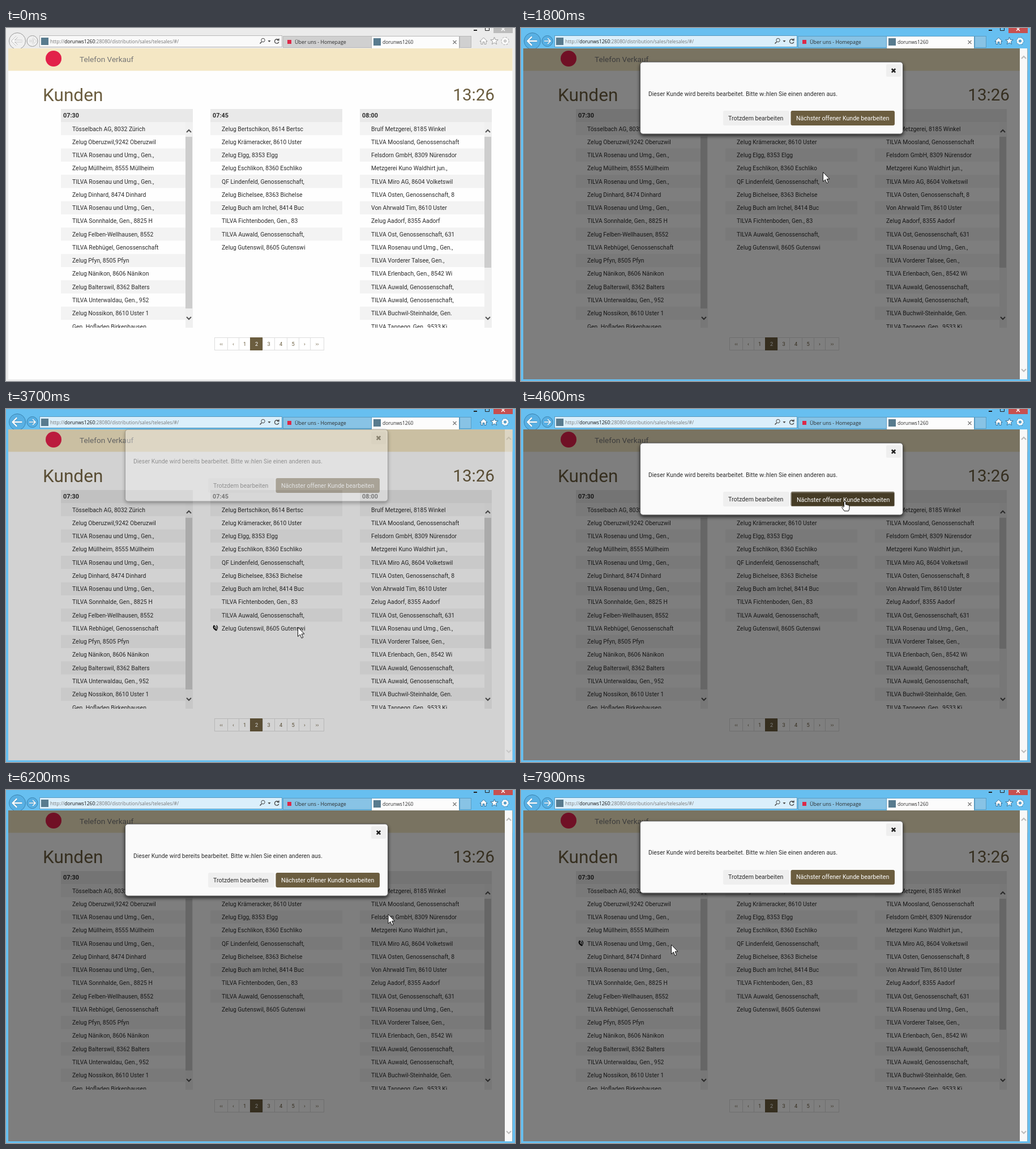
An HTML page for the animation above (8 s loop, 899 by 623 pixels).

```html
<!DOCTYPE html>
<html lang="de">
<head>
<meta charset="utf-8">
<title>Telefon Verkauf</title>
<style>
html, body { margin: 0; width: 100%; height: 100%; overflow: hidden; }
svg {
  display: block; width: 899px; height: 623px;
  font: 10.4px Roboto, sans-serif; fill: #2c2c2c;
  --chrome: #ebebeb; --bar: #f9f9f9; --edge: #b8b8b8; --tab: #d0d0d0;
  --disc: #f0f0f0; --ring: #9a9a9a; --glyph: #fff; --line: #999; --close: #bcbcbc;
}
svg.active {
  --chrome: #67bff0; --bar: #dbeffb; --edge: #5a9cc2; --tab: #88c3e5;
  --disc: #58b0e4; --ring: #3c83ae; --glyph: #fff; --line: #2f6f98; --close: #c75050;
}
.ui { font-family: "Open Sans", sans-serif; }
.line { fill: none; stroke: #444; }
.olive { fill: #6b5d3f; }
</style>
</head>
<body>
<svg id="stage" viewBox="0 0 899 623"></svg>
<script>
const stage = document.getElementById('stage');

const rect = (x, y, w, h, fill, extra = '') =>
  `<rect x="${x}" y="${y}" width="${w}" height="${h}" style="fill:${fill}" ${extra}/>`;
const text = (x, y, str, extra = '') => `<text x="${x}" y="${y}" ${extra}>${str}</text>`;
const line = (d, color, width = 1, extra = '') =>
  `<path d="${d}" class="line" style="stroke:${color};stroke-width:${width}" ${extra}/>`;
const shape = (d, fill, stroke, extra = '') =>
  `<path d="${d}" style="fill:${fill};stroke:${stroke}" ${extra}/>`;
const chevron = (x, y, dir, color) =>
  line(`M${x - 4} ${y + 2 * dir}l4 ${-4 * dir}l4 ${4 * dir}`, color, 2);

function navButton(x, r) {
  const a = r * .58;
  const flip = r < 12 ? -1 : 1;
  const arrow = `M${a} 0H${-a}M${-a * .1} ${-a * .9}L${-a} 0L${-a * .1} ${a * .9}`;
  return `<g transform="translate(${x} 23) scale(${flip} 1)">
    <circle r="${r}" style="fill:var(--disc);stroke:var(--ring)"/>
    ${line(arrow, 'var(--ring)', r / 4.2)}${line(arrow, 'var(--glyph)', r / 6)}</g>`;
}

function browser() {
  const star = Array.from({ length: 10 }, (_, i) => {
    const a = i * Math.PI / 5 - Math.PI / 2, r = i % 2 ? 3 : 7;
    return `${862.5 + r * Math.cos(a)},${23 + r * Math.sin(a)}`;
  }).join(' ');
  return rect(0, 0, 899, 623, 'var(--chrome)') +
    navButton(20, 14.5) + navButton(46.5, 9.5) +
    rect(59.5, 13.5, 428, 20, 'var(--bar)', 'stroke="var(--edge)"') +
    rect(62, 17, 13, 13, '#587b8e') +
    `<g class="ui" font-size="8.5">
      <text x="78" y="27" fill="#777">http://<tspan fill="#111">dorunws1260</tspan>:28080/distribution/sales/telesales/#/</text>` +
    line('M451.5 24.5l-3 3', '#444', 1.6) +
    '<circle cx="454" cy="21.5" r="3.2" class="line"/>' +
    shape('M462.5 22h5l-2.5 3z', '#444', 'none') +
    line('M481 21a3.7 3.7 0 1 0 .8 3.5M482 18.5v3h-3', '#444', 1.3) +
    rect(489.5, 14.5, 156, 20, 'var(--tab)', 'stroke="var(--edge)"') +
    rect(497, 21, 7, 7, '#dd2948') +
    text(510, 28, 'Über uns - Homepage', 'font-size="8.9"') +
    rect(645.5, 14.5, 155, 22, '#fcfcfc', 'stroke="var(--edge)"') +
    rect(649, 18, 13, 13, '#587b8e') + text(665, 28, 'dorunws1260') + '</g>' +
    line('M789.5 22l6 6m0 -6l-6 6', '#777', 1.2) +
    rect(801.5, 14.5, 20, 20, 'var(--tab)', 'stroke="var(--edge)"') +
    shape('M837 23.5l6.5 -6.5l6.5 6.5h-2v5h-3v-4h-3v4h-3v-5z', 'var(--glyph)', 'var(--line)') +
    `<polygon points="${star}" style="fill:var(--glyph);stroke:var(--line)"/>` +
    '<g transform="translate(881.5 23)" style="fill:none;stroke:var(--glyph)">' +
    '<circle r="5.6" style="stroke:var(--line);stroke-width:3;stroke-dasharray:2.2"/>' +
    '<circle r="3.7" style="stroke-width:3"/>' +
    '<circle r="5.6" style="stroke-width:1.5;stroke-dasharray:2.2"/>' +
    '<circle r="2" style="stroke:var(--line)"/></g>' +
    rect(826, 3, 6, 2, '#222') + line('M846.5 0v4.5h7v-4.5', '#222') +
    rect(861, 0, 34, 9, 'var(--close)') + line('M875 -1l6 6m0 -6l-6 6', '#fff', 1.4);
}

const shop = place => 'Zelug ' + place, coop = name => 'TILVA ' + name;
const village = coop('Rosenau und Umg., Gen.,'), valley = coop('Auwald, Genossenschaft,');
const columns = [
  { x: 97, time: '07:30', thumb: 303, rows: [
    'Tösselbach AG, 8032 Zürich', shop('Oberuzwil,9242 Oberuzwil'), village,
    shop('Müllheim, 8555 Müllheim'), village, shop('Dinhard, 8474 Dinhard'), village,
    coop('Sonnhalde, Gen., 8825 H'), shop('Felben-Wellhausen, 8552'),
    coop('Rebhügel, Genossenschaft'), shop('Pfyn, 8505 Pfyn'), shop('Nänikon, 8606 Nänikon'),
    shop('Balterswil, 8362 Balters'), coop('Unterwaldau, Gen., 952'),
    shop('Nossikon, 8610 Uster 1'), 'Gen. Hofladen Birkenhausen'] },
  { x: 361, time: '07:45', rows: [
    shop('Bertschikon, 8614 Bertsc'), shop('Krämeracker, 8610 Uster'), shop('Elgg, 8353 Elgg'),
    shop('Eschlikon, 8360 Eschliko'), 'QF Lindenfeld, Genossenschaft,',
    shop('Bichelsee, 8363 Bichelse'), shop('Buch am Irchel, 8414 Buc'),
    coop('Fichtenboden, Gen., 83'), valley, shop('Gutenswil, 8605 Gutenswi')] },
  { x: 625, time: '08:00', thumb: 231, rows: [
    'Brulf Metzgerei, 8185 Winkel', coop('Moosland, Genossenschaft'),
    'Felsdorn GmbH, 8309 Nürensdor', 'Metzgerei Kuno Waldhirt jun.,',
    coop('Miro AG, 8604 Volketswil'), coop('Osten, Genossenschaft, 8'),
    'Von Ahrwald Tim, 8610 Uster', shop('Aadorf, 8355 Aadorf'),
    coop('Ost, Genossenschaft, 631'), village, coop('Vorderer Talsee, Gen.,'),
    coop('Erlenbach, Gen., 8542 Wi'), valley, valley,
    coop('Buchwil-Steinhalde, Gen.'), coop('Tannegg, Gen., 9533 Ki')] }
];

function column({ x, time, thumb, rows }) {
  const pitch = 23.27, width = thumb ? 220 : 233;
  let out = rect(x, 143, 233, 23, '#e9e9e9') +
    text(x + 4, 158, time, 'font-weight="700" font-size="10.8"');
  rows.forEach((row, i) => {
    const y = 166 + i * pitch;
    if (i % 2 == 0) out += rect(x, y, width, pitch, '#f3f3f3');
    out += text(x + 20, y + 15.5, row);
  });
  if (thumb) out += rect(x + 220, 166, 13, 363, '#f0f0f0') +
    rect(x + 220, 192, 12, thumb, '#cdcdcd') +
    chevron(x + 226, 182, 1, '#555') + chevron(x + 226, 512, -1, '#555');
  return `<g clip-path="url(#list)">${out}</g>`;
}

function pager() {
  const edges = [368, 391, 411, 431, 453, 474, 496, 517, 537, 561];
  return '<g text-anchor="middle" font-size="9.3">' +
    ['‹‹', '‹', 1, 2, 3, 4, 5, '›', '››'].map((label, i) => {
      const x = edges[i], w = edges[i + 1] - x, on = label === 2;
      return rect(x + .5, 546.5, w, 22, on ? '#6b5d3f' : '#fff', `stroke="${on ? '#6b5d3f' : '#ddd'}"`) +
        text(x + w / 2 + .5, 561, label, `fill="${on ? '#fff' : '#6b5d3f'}"`);
    }).join('') + '</g>';
}

const page = () => rect(4, 36, 890.5, 584, '#fefefe') +
  rect(4, 36, 890.5, 39.5, '#f4e7c4') +
  '<circle cx="84" cy="54" r="14" fill="#e2214a"/>' +
  text(130, 60, 'Telefon Verkauf', 'font-size="13.6" fill="#777"') +
  `<g class="olive">${text(65, 128.5, 'Kunden', 'font-size="31.6"')}
   ${text(863, 128, '13:26', 'font-size="29.6" text-anchor="end"')}</g>` +
  columns.map(column).join('') + pager();

const phone = () => `<g id="phone">
  ${line('M-2.5 -3.8Q-5 .5 1.5 4', '#111', 2.4)}
  ${line('M-3 -4.6l1.8 2M0 2.3l2.6 1.7', '#111', 2.2)}
  ${line('M0 -2.5q1.8 1.6 .6 3.6M1.5 -4.7q3.5 3 1.2 7', '#111', 1.2)}</g>`;

const dialog = () => `<g id="modal">
  ${rect(881, 36, 13, 584, '#f8f8f8')}${chevron(888, 52, 1, '#bbb')}${chevron(888, 604, -1, '#bbb')}
  <g id="box">
    ${rect(210.5, 60, 464, 127, '#fafafa', 'rx="5" stroke="#555" filter="url(#shadow)"')}
    ${rect(645, 64, 26, 22, '#efefef', 'rx="2"')}
    ${line('M654.8 72l6.4 6.4m0 -6.4l-6.4 6.4', '#222', 2.6)}
    ${text(225, 119.5, 'Dieser Kunde wird bereits bearbeitet. Bitte w<tspan font-size="7">□</tspan>hlen Sie einen anderen aus.')}
    <g font-size="10.58">
      ${rect(357, 146, 117, 26, '#efefef', 'rx="3"')}${text(366, 162.5, 'Trotzdem bearbeiten')}
      <rect id="next" x="476.5" y="146" width="183.5" height="26" rx="3"/>
      ${rect(477.5, 147.5, 182, 24, 'none', 'id="focus" stroke="#ddd" stroke-dasharray="1"')}
      ${text(486, 162.5, 'Nächster offener Kunde bearbeiten', 'id="label" fill="#fff"')}
    </g>
  </g></g>`;

const pointers = () => '<g id="pointer">' +
  shape('M0 0V16.5L3.9 13L6.5 19.3L9.2 18.2L6.6 12H11.5Z', '#fff', '#111', 'id="arrow"') +
  shape('M-1.5 9V1Q0 -1 1.5 1V5.5L6 6.5Q8 7 8 9V13L6.5 17H-1L-5.5 10.5Q-4.5 8 -2.5 10.5Z',
    '#fff', '#111', 'id="hand"') + '</g>';

stage.innerHTML = `<defs><clipPath id="list"><rect y="143" width="899" height="386"/></clipPath>
  <filter id="shadow" x="-10%" y="-20%" width="120%" height="150%">
    <feDropShadow dx="0" dy="3" stdDeviation="3" flood-opacity=".7"/></filter></defs>` +
  browser() + page() + phone() +
  rect(4, 36, 890.5, 584, '#000', 'id="backdrop"') + dialog() + pointers();

const el = Object.fromEntries([...stage.querySelectorAll('[id]')].map(e => [e.id, e]));

// time, x, y
const path = [
  [100, 817, 130], [500, 515.5, 337], [1700, 515.5, 337], [1800, 533.5, 254.5],
  [2200, 560, 185], [2500, 572, 163], [2700, 572, 163], [3100, 515.5, 375],
  [3200, 515.5, 375], [3400, 515.5, 385], [4000, 515.5, 385], [4400, 572, 163],
  [5200, 572, 163], [5500, 679, 224.5], [5700, 692, 240], [6100, 692, 240],
  [6500, 624, 157], [6900, 624, 157], [7500, 265.5, 273], [8000, 265.5, 273]
];
// open, press, close
const modals = [[1195, 2650, 2700], [3625, 4500, 5112], [5700, 6500, 6555], [7648, 9e3, 9e3]];
// from, to, x, y
const hovers = [[900, 1800, 370, 341], [3100, 4050, 370, 386.5], [5600, 6150, 634, 248], [7500, 8000, 106, 270.5]];

const clamp = v => Math.max(0, Math.min(1, v));
const show = (e, on) => e.style.display = on ? '' : 'none';
const move = (e, x, y) => e.setAttribute('transform', `translate(${x} ${y})`);

function pointAt(t) {
  const i = Math.max(1, path.findIndex(k => k[0] > t));
  const [a, b] = [path[i - 1], path[i]], k = clamp((t - a[0]) / (b[0] - a[0]));
  return [a[1] + (b[1] - a[1]) * k, a[2] + (b[2] - a[2]) * k];
}

function draw(t) {
  stage.classList.toggle('active', t >= 900);

  const [open, press, close] = modals.findLast(m => t >= m[0]) || [9e3, 9e3, 9e3];
  const opacity = clamp((t - open) / 190) * (1 - clamp((t - close) / 200));
  const slide = clamp((t - open) / 300) * (1 - clamp((t - close) / 300));
  const shade = clamp((t - open) / 215) * (1 - clamp((t - close - 150) / 250));
  el.backdrop.style.opacity = shade / 2;
  el.modal.style.opacity = opacity;
  move(el.box, 0, -32 * (1 - slide));

  const [x, y] = pointAt(t);
  const over = opacity > 0 && x > 476 && x < 660 && y > 146 && y < 172;
  const pressed = t >= press;
  show(el.pointer, t >= 100);
  move(el.pointer, x, y);
  show(el.arrow, !over);
  show(el.hand, over);
  el.next.style.fill = over || pressed ? '#463c26' : '#6b5d3f';
  show(el.focus, pressed);
  move(el.label, +pressed, +pressed);

  const hover = hovers.find(h => t >= h[0] && t < h[1]);
  show(el.phone, hover);
  if (hover) move(el.phone, hover[2], hover[3]);
}

// The screen advances in steps of 100 ms.
const start = performance.now();
function tick() {
  draw(Math.floor((performance.now() - start) % 8000 / 100) * 100);
  requestAnimationFrame(tick);
}
tick();
</script>
</body>
</html>
```
